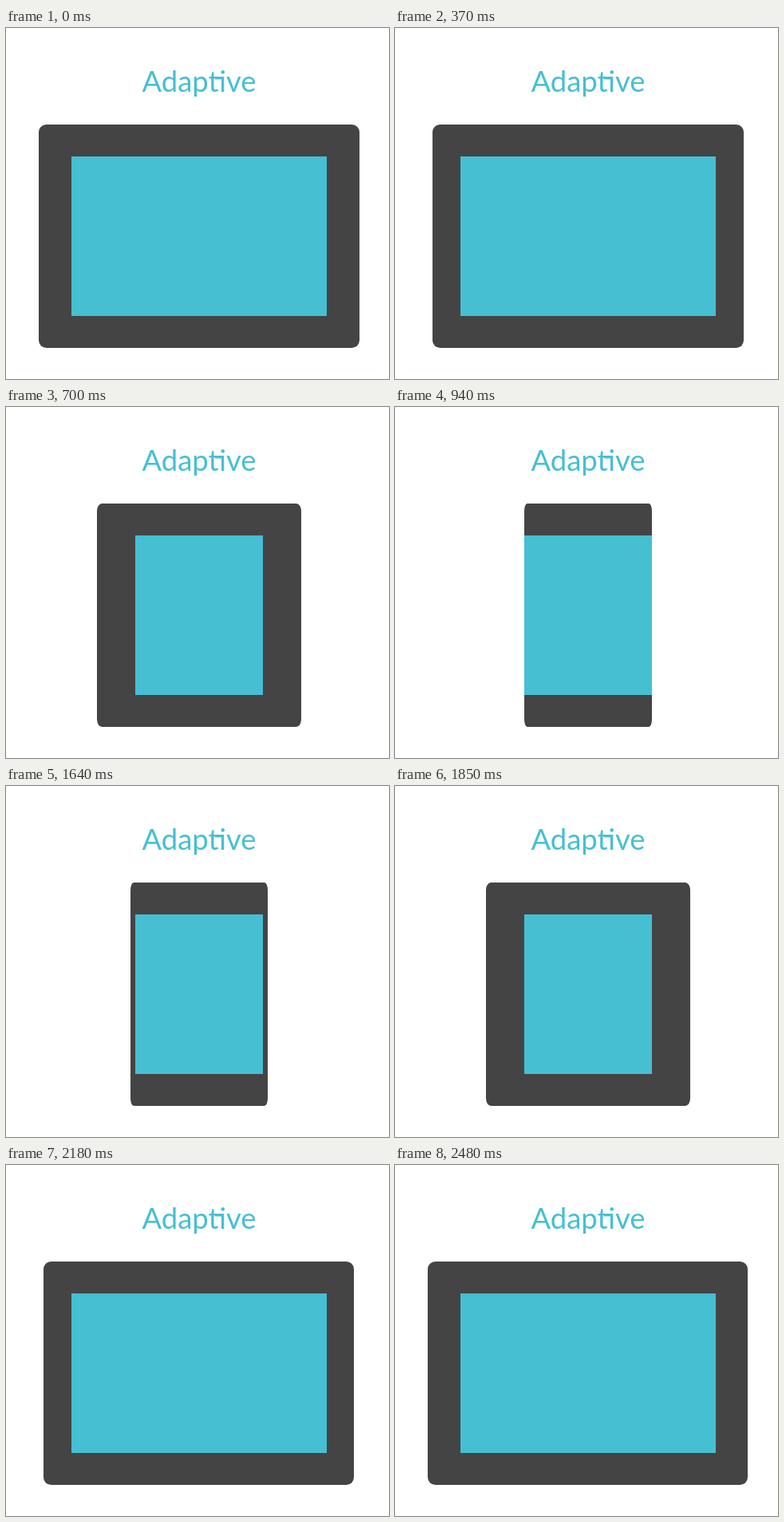
Recreate the animation shown at these times as an HTML page. Size 480 by 440 pixels, loop 2510 ms.

```html
<!DOCTYPE html>
<html lang="en">
<head>
<meta charset="utf-8">
<title>Adaptive</title>
<style>
  :root { --loop: 2510ms; --blue: #46bfd3; --dark: #444; }
  html, body { margin: 0; width: 100%; height: 100%; overflow: hidden; background: #fff; }
  .stage { position: relative; width: 480px; height: 440px; overflow: hidden; }
  .title { position: absolute; left: 0; top: 0; fill: var(--blue); }
  .title text { font: 400 36.5px Lato, Calibri, sans-serif; text-anchor: middle; }
  .device, .screen { position: absolute; }
  .device {
    top: 121px; height: 280px; left: 41px; right: 37px;
    background: var(--dark);
    border-radius: 2.4% / 3.4%;
    animation: resize var(--loop) linear infinite;
  }
  .screen {
    top: 161px; height: 200px; left: 82px; width: 320px;
    background: var(--blue);
    animation: snap var(--loop) step-end infinite;
  }
  /* The device glides in 30 ms steps; the screen jumps at its breakpoint. */
  @keyframes resize {
    0% { left: 41px; right: 37px; }
    13.54% { left: 41px; right: 37px; animation-timing-function: steps(20, end); }
    37.44% { left: 162px; right: 158px; }
    64.14% { left: 162px; right: 158px; animation-timing-function: steps(20, end); }
    88.04%, 100% { left: 41px; right: 38px; }
  }
  @keyframes snap {
    0%, 80.87%, 100% { left: 82px; width: 320px; }
    21.91% { left: 162px; width: 160px; }
  }
</style>
</head>
<body>
<div class="stage">
  <svg class="title" width="480" height="110">
    <text x="242" y="80">Adaptive</text>
    <!-- joins t and i -->
    <rect x="262" y="61.8" width="9" height="2.6"/>
  </svg>
  <div class="device"></div>
  <div class="screen"></div>
</div>
</body>
</html>
```
